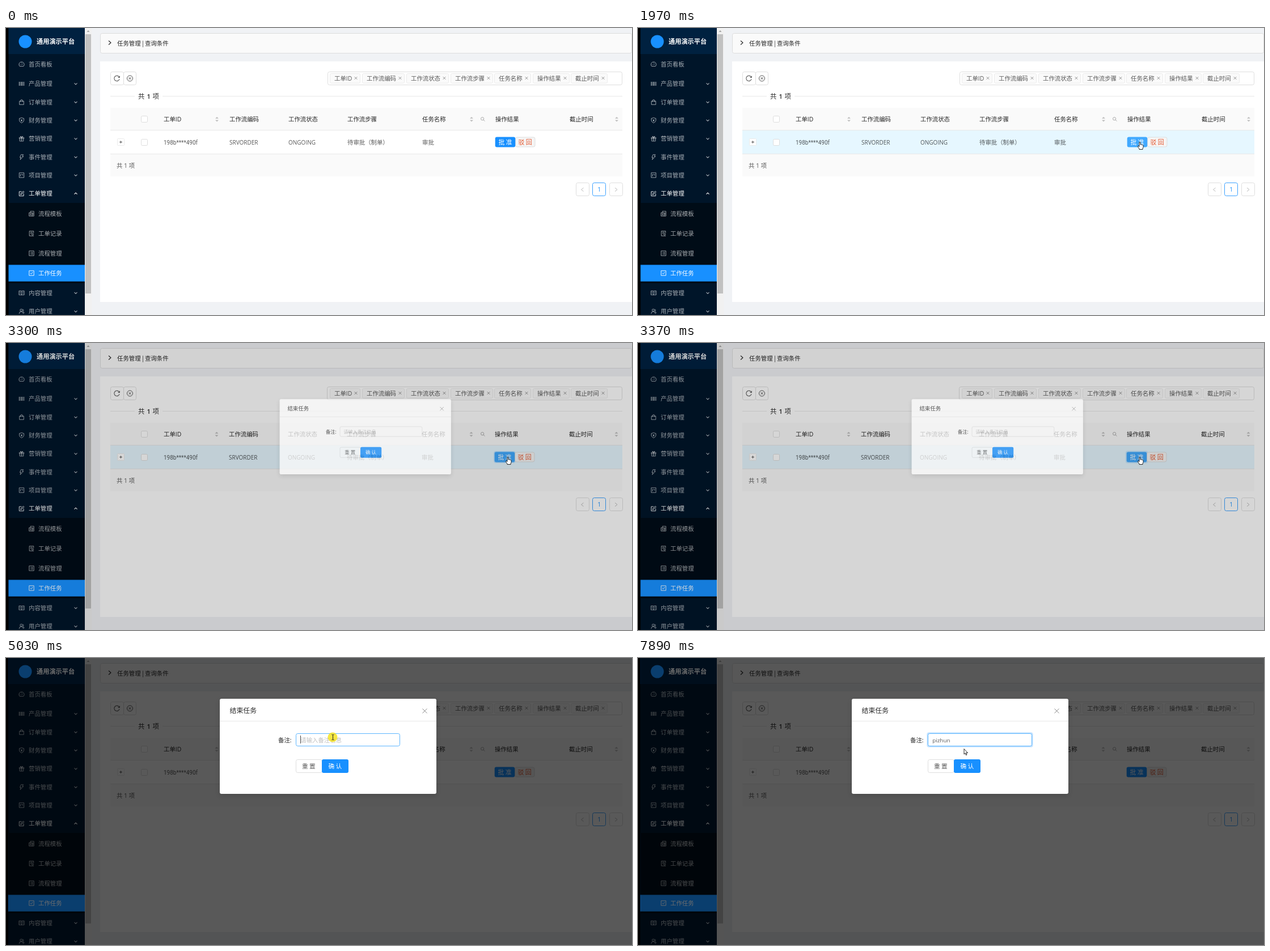
Write an HTML page with a canvas that moves like this. It is 1104 px wide and 507 px high and loops after 7.99 s.

```html
<!DOCTYPE html>
<html lang="zh-CN">
<head>
<meta charset="utf-8">
<title>任务审批</title>
<style>
html, body { margin: 0; width: 100%; height: 100%; overflow: hidden; background: #000; }
canvas { display: block; width: 100%; height: 100%; }
</style>
</head>
<body>
<canvas id="stage" width="1104" height="507"></canvas>
<script>
const stage = document.getElementById('stage').getContext('2d');
const layer = new OffscreenCanvas(1104, 507).getContext('2d');
let c = stage;
const LOOP = 7990, OPEN = 3250, CLICK = 3130, FOCUS = 5030;
const BLUE = '#1890ff', LIGHT = '#40a9ff', LINE = '#d9d9d9', RULE = '#e8e8e8';
const DARK = 'rgba(0,0,0,.85)', BODY = 'rgba(0,0,0,.65)', GREY = 'rgba(0,0,0,.45)';
const SANS = '"Open Sans","Noto Sans CJK SC","Noto Sans CJK",sans-serif';
const CJK = '"Noto Sans CJK SC","Noto Sans CJK",sans-serif';

const clamp = v => Math.max(0, Math.min(1, v));
const ramp = (t, a, b) => clamp((t - a) / (b - a));
const tick = t => Math.floor((t - 20) / 80) * 80 + 20;

function text(s, x, y, color = BODY, size = 10.4, weight = 400, font = SANS) {
  c.font = `${weight} ${size}px ${font}`;
  c.fillStyle = color;
  c.fillText(s, x, y + size * 0.37);
}
function rect(x, y, w, h, fill) {
  c.fillStyle = fill;
  c.fillRect(x, y, w, h);
}
function box(x, y, w, h, r, fill, border, width = 0.85) {
  const inset = border ? 0.5 : 0;
  c.beginPath();
  c.roundRect(x + inset, y + inset, w - 2 * inset, h - 2 * inset, r);
  if (fill) { c.fillStyle = fill; c.fill(); }
  if (border) { c.strokeStyle = border; c.lineWidth = width; c.stroke(); }
}
function path(d, x, y, stroke, width = 1, fill) {
  const p = new Path2D(d);
  c.save();
  c.translate(x, y);
  c.lineJoin = 'round';
  if (fill) { c.fillStyle = fill; c.fill(p); }
  if (stroke) { c.strokeStyle = stroke; c.lineWidth = width; c.stroke(p); }
  c.restore();
}
function cross(x, y, r, color, width = 0.9) {
  path(`M${-r} ${-r}L${r} ${r}M${r} ${-r}L${-r} ${r}`, x, y, color, width);
}
function ease(x) {
  // cubic-bezier(.08, .82, .17, 1)
  const at = (u, a, b) => 3 * u * (1 - u) ** 2 * a + 3 * u * u * (1 - u) * b + u ** 3;
  let lo = 0, hi = 1;
  for (let i = 0; i < 20; i++) {
    const mid = (lo + hi) / 2;
    if (at(mid, 0.08, 0.17) < x) lo = mid; else hi = mid;
  }
  return at(hi, 0.82, 1);
}

// Icons live in a 10 x 10 box
const icons = {
  gauge: 'M1.6 8.6A4.6 4.6 0 1 1 8.4 8.6ZM5 6L7 3.8M2.2 5.5H3M5 2.2V3',
  bars: 'M.7 1.5V8.5M2.4 1.5V8.5M4.6 1.5V8.5M5.4 1.5V8.5M7.4 1.5V8.5M9.3 1.5V8.5',
  bag: 'M1.2 3.2H8.8V9.3H1.2ZM3.2 4.6V2.4A1.8 1.8 0 0 1 6.8 2.4V4.6',
  shield: 'M5 .5L9 1.8V5.5Q8.5 8 5 9.7Q1.5 8 1 5.5V1.8ZM3.5 3.2L5 5L6.5 3.2M5 5V7.3M3.7 5.5H6.3',
  gift: 'M.9 3H9.1V5H.9ZM1.7 5V9.3H8.3V5M5 3V9.3M5 3Q2 2.7 3 1Q4.5 .5 5 3Q5.5 .5 7 1Q8 2.7 5 3',
  bolt: 'M4 .7H8L6.2 3.8H8.3L2.5 9.5L4 5.6H2Z',
  board: 'M.8 .8H9.2V9.2H.8ZM3 3V7M5 3V4.6M7 3V5.6',
  form: 'M8.6 5V9.2H.8V1.5H5M3.2 6.9L3.6 5L8 .8L9.3 2.1L5 6.4Z',
  book: 'M.4 1.5H4Q5 1.6 5 2.5V9Q5 8.5 4 8.4H.4ZM9.6 1.5H6Q5 1.6 5 2.5M5 9Q5 8.5 6 8.4H9.6V1.5M1.8 3.7H3.5M1.8 5.7H3.5M6.5 3.7H8.2M6.5 5.7H8.2',
  users: 'M2.4 3A2 2 0 1 1 6.4 3A2 2 0 1 1 2.4 3M.7 9.3Q1 5.3 4.4 5.3Q7.6 5.3 8 9.3M7 1.2Q9 2 8.2 4.2L7.4 5Q9.2 6 9.5 8.4',
  pages: 'M.7 9.2V3.4H3V.8H9.2V9.2ZM3 3.4H6.2V9.2M2 5.5H4.8M2 7.2H4.8M7.7 3V7.5',
  audit: 'M8.7 4V.8H1.2V9.2H5M3 3H7M3 5H5M8.5 6.4A1.5 1.5 0 1 0 5.5 6.4A1.5 1.5 0 1 0 8.5 6.4M5 9.3H9',
  list: 'M.8 .8H9.2V9.2H.8ZM2.6 3.2H3.4M4.6 3.2H7.5M2.6 5H3.4M4.6 5H7.5M2.6 6.8H3.4M4.6 6.8H7.5',
  check: 'M.8 .8H9.2V9.2H.8ZM2.8 4.8L4.5 6.6L7.3 3.2'
};
const menu = [
  ['gauge', '首页看板', 64], ['bars', '产品管理', 98.5], ['bag', '订单管理', 131],
  ['shield', '财务管理', 163], ['gift', '营销管理', 195.5], ['bolt', '事件管理', 228],
  ['board', '项目管理', 260], ['form', '工单管理', 292.5], ['book', '内容管理', 468], ['users', '用户管理', 500.5]
];
const submenu = [
  ['pages', '流程模板', 328], ['audit', '工单记录', 363], ['list', '流程管理', 398], ['check', '工作任务', 433]
];

function sidebar() {
  rect(0, 0, 5, 507, '#000');
  rect(4.5, 0, 134.5, 507, '#001529');
  rect(4.5, 0, 134.5, 46, '#002140');
  rect(4.5, 309, 134.5, 142, '#000c17');
  rect(4.5, 418.4, 134.5, 29.3, BLUE);
  c.fillStyle = BLUE;
  c.beginPath();
  c.arc(34, 24, 11.5, 0, 7);
  c.fill();
  text('通用演示平台', 54, 24, '#fff', 11.2, 700);
  const dim = 'rgba(255,255,255,.65)';
  for (const [icon, label, y] of menu) {
    const open = icon === 'form', color = open ? '#fff' : dim;
    path(icons[icon], 22.5, y - 5, color, 0.9);
    text(label, 40, y, color, 10.4, open ? 500 : 400);
    if (icon !== 'gauge') path(open ? 'M-2.5 1.2L0-1.3L2.5 1.2' : 'M-2.5-1.2L0 1.3L2.5-1.2', 123, y, color, 1.1);
  }
  for (const [icon, label, y] of submenu) {
    const color = icon === 'check' ? '#fff' : dim;
    path(icons[icon], 40, y - 5, color, 0.9);
    text(label, 57, y, color);
  }
  rect(139, 0, 12, 507, '#f1f1f1');
  rect(140, 11, 10, 458, '#c1c1c1');
  path('M-2.5 1.5L0-1.5L2.5 1.5Z', 145, 5.5, null, 0, '#a3a3a3');
}

function toolbar(dx) {
  box(166, 9, 938, 36, 3, '#fafafa', LINE);
  path('M-2-3.5L2 0L-2 3.5', 183, 26, DARK, 1.1);
  text('任务管理 | 查询条件', 196, 27, DARK, 10.4, 400, CJK);
  rect(166, 59, 938, 425, '#fff');
  box(184, 77, 24, 24, 3, '#fff', LINE);
  box(207, 77, 23, 24, 3, '#fff', LINE);
  path('M4.3-2A4.7 4.7 0 1 0 4.6 1.2M4.8-4.2V-1.5H2', 195.5, 89, BODY, 1.1);
  path('M5 0A5 5 0 1 1-5 0A5 5 0 1 1 5 0', 218.5, 89, BODY, 1);
  cross(218.5, 89, 2, BODY, 1);
  box(567 + dx, 77, 520 - dx, 24, 3, '#fff', LINE);
  const tags = [['工单ID', 571, 54], ['工作流编码', 628, 75], ['工作流状态', 706, 75], ['工作流步骤', 784, 75],
    ['任务名称', 861, 65], ['操作结果', 929, 65], ['截止时间', 996, 65]];
  for (const [label, x, w] of tags) {
    box(x, 80, w, 18, 2, '#fafafa', RULE);
    text(label, x + 8, 89);
    cross(x + w - 8, 88.5, 2.4, GREY);
  }
  rect(184, 120, 43, 1, RULE);
  rect(276, 120, 811, 1, RULE);
  text('共', 233, 120.5, DARK, 11.4);
  text('1', 248.5, 120.5, DARK, 11, 600);
  text('项', 258.5, 120.5, DARK, 11.4);
}

function sorter(x) {
  path('M-3-1L0-4L3-1ZM-3 1.5L0 4.5L3 1.5Z', x, 161, null, 0, '#bfbfbf');
}
function tickBox(y) {
  box(238, y, 12, 12, 2, '#fff', LINE);
}

function table(t, dx, hover) {
  rect(184, 141, 903, 40, '#fafafa');
  rect(184, 180, 903, 1, RULE);
  if (hover > 0) rect(184, 181, 903, 41, `rgba(230,247,255,${hover})`);
  rect(184, 222, 903, 1, RULE);
  rect(184, 223, 903, 39, '#fafafa');
  tickBox(155);
  tickBox(196);
  box(196, 195, 13, 13, 1, '#fff', RULE);
  path('M-2.5 0H2.5M0-2.5V2.5', 202.5, 201.5, BODY, 0.9);

  const heads = [['工单ID', 278], ['工作流编码', 394 + dx], ['工作流状态', 498 + dx], ['工作流步骤', 602 + dx],
    ['任务名称', 734 + dx], ['操作结果', 863 + dx], ['截止时间', 994 + dx]];
  for (const [label, x] of heads) text(label, x, 161, DARK, 10.4, 500);
  for (const x of [372, 821, 1077]) sorter(x + dx / 2);
  path('M2.2-.7A2.6 2.6 0 1 1-3-.7A2.6 2.6 0 1 1 2.2-.7M1.5 1.2L4 3.6', 840.5, 161, '#aaa', 1);

  text('198b****490f', 278, 202, BODY, 10, 400, 'Roboto,sans-serif');
  text('SRVORDER', 394 + dx, 202, BODY, 10);
  text('ONGOING', 498 + dx, 202, BODY, 10);
  text('待审批（制单）', 602 + dx, 202);
  text('审批', 734 + dx, 202);
  text('共 1 项', 195, 243);

  const wave = ramp(t, 3200, 3600);
  if (wave > 0 && wave < 1) {
    const g = 1 + wave * 3;
    box(863 + dx - g, 192.7 - g, 35 + 2 * g, 17.6 + 2 * g, 4, `rgba(24,144,255,${0.3 * (1 - wave)})`);
  }
  box(898 + dx, 192.5, 35.5, 18, 3, '#f5f5f5', LINE);
  box(862.7 + dx, 192.6, 35.5, 17.8, 3, t >= 1970 && t < 3620 ? LIGHT : BLUE);
  text('批 准', 868.5 + dx, 202, '#fff', 10.9, 400, CJK);
  text('驳 回', 903.5 + dx, 202, '#e4572e', 10.9, 400, CJK);
}

function pager() {
  for (const [x, color] of [[1005, LINE], [1034, BLUE], [1064, LINE]]) box(x, 273, 24, 24, 3, '#fff', color);
  path('M2-3.2L-2 0L2 3.2', 1016.5, 285.5, '#bbb', 1);
  text('1', 1043.3, 285, BLUE);
  path('M-2-3.2L2 0L-2 3.2', 1076, 285.5, '#bbb', 1);
}

const typed = [[6280, 'p'], [6500, 'pi'], [6760, 'piz'], [6810, 'pizhu'], [6960, 'pizhun']];

function dialog(t, pointer) {
  c.save();
  c.shadowColor = 'rgba(0,0,0,.15)';
  c.shadowBlur = 9;
  c.shadowOffsetY = 3;
  box(377, 72, 382, 168, 3, '#fff');
  c.restore();
  rect(377, 111, 382, 1, RULE);
  text('结束任务', 394.5, 92.5, DARK, 11.9);
  cross(738.5, 93.5, 4, GREY, 1);
  text('备注:', 480, 145, DARK);

  const focus = ramp(t, FOCUS + 20, FOCUS + 160);
  if (focus > 0) box(509.3, 131.3, 187.4, 26.4, 4, `rgba(24,144,255,${0.25 * focus})`);
  box(511, 133, 184, 23, 3, '#fff', t >= FOCUS || pointer.kind === 'beam' ? LIGHT : LINE);
  const value = (typed.filter(e => t >= e[0]).pop() || [0, ''])[1];
  if (value) text(value, 519.3, 145, BODY, 9.8);
  else text('请输入备注信息', 519.3, 145, '#bfbfbf');
  const blink = t >= FOCUS && t < 5580 || t >= 6130 && t < 7540;
  if (blink) {
    c.font = `9.8px ${SANS}`;
    rect(519 + Math.round(c.measureText(value).width * 0.98), 137, 1, 14, '#444');
  }

  box(511, 179, 47, 24, 3, '#fff', LINE);
  box(557, 179, 47, 24, 3, pointer.kind === 'hand' && t > 3800 ? LIGHT : BLUE);
  text('重 置', 522, 191, BODY, 10.7, 400, CJK);
  text('确 认', 568.5, 191, '#fff', 10.7, 500, CJK);
}

// Zooms out of the clicked button and fades in as one group
function popup(t, pointer) {
  const k = ease(ramp(tick(t), OPEN, OPEN + 300));
  const s = 0.2 + 0.8 * k, ox = 883, oy = 202;
  c = layer;
  c.clearRect(0, 0, 1104, 507);
  c.save();
  c.translate(ox, oy);
  c.scale(s, s);
  c.translate(-ox, -oy);
  dialog(t, pointer);
  c.restore();
  c = stage;
  c.globalAlpha = k;
  c.drawImage(layer.canvas, 0, 0);
  c.globalAlpha = 1;
}

const route = [
  [260, 1030, 484], [1060, 904, 260], [1780, 886, 197], [1860, 885, 201], [3540, 885, 201], [3860, 598, 199],
  [4020, 598, 199], [4180, 585, 194], [4260, 585, 194], [4740, 576, 140]
];
const inside = (x, y, l, t, r, b) => x >= l && x <= r && y >= t && y <= b;

function pointerAt(t) {
  if (t >= 7890) return { x: 574.5, y: 160, kind: 'arrow' };
  if (t < 260) return { kind: 'none' };
  const q = tick(t), i = route.findIndex(p => p[0] > q);
  let [, x, y] = route[route.length - 1];
  if (i > 0) {
    const [a, ax, ay] = route[i - 1], [b, bx, by] = route[i], k = ramp(q, a, b);
    x = ax + (bx - ax) * k;
    y = ay + (by - ay) * k;
  }
  let kind = 'arrow';
  if (inside(x, y, 863, 193, 898, 210) && t < 3620) kind = 'hand';
  if (t > 3700 && inside(x, y, 557, 179, 604, 203)) kind = 'hand';
  if (t > 4200 && inside(x, y, 511, 133, 695, 156)) kind = 'beam';
  return { x, y, kind };
}

const shapes = {
  arrow: 'M.5 .5V10L2.6 8.2L4 11.6L5.5 10.9L4.1 7.6H7Z',
  hand: 'M-1 1Q0-.6 1 1V5Q2 4.3 2.8 5.2Q4 4.6 4.5 5.6Q5.7 5.2 6 6.4V9.5Q5.8 11 5 12V13.5H-1V12.3L-3.7 8.6Q-3.8 7-2.2 7.5L-1 8.6Z'
};

function cursor(t, { x, y, kind }) {
  if (kind === 'none') return;
  if (t >= CLICK && t < 3290 || t >= FOCUS && t < 5110) {
    c.fillStyle = 'rgba(245,225,20,.8)';
    c.beginPath();
    c.arc(x, y, 8.5, 0, 7);
    c.fill();
  }
  if (kind === 'beam') path('M-2-4.5H-.6L0-4L.6-4.5H2M0-4V4M-2 4.5H-.6L0 4L.6 4.5H2', x + 0.5, y, '#222', 1);
  else path(shapes[kind], x, y, '#111', 0.9, '#fff');
}

function draw(t) {
  const dx = t >= OPEN ? -1 : 0;
  const pointer = pointerAt(t);
  const hover = ramp(tick(t), 1500, 1780) * (1 - ramp(tick(t), 3540, 3860));
  rect(0, 0, 1104, 507, '#f0f2f5');
  sidebar();
  toolbar(dx);
  table(t, dx, hover);
  pager();
  if (tick(t) >= OPEN) {
    const fade = ramp(tick(t), OPEN, OPEN + 200);
    rect(5, 0, 134, 507, `rgba(0,0,0,${0.57 * fade})`);
    rect(139, 0, 965, 507, `rgba(0,0,0,${0.65 * fade})`);
    popup(t, pointer);
  }
  cursor(t, pointer);
}

const start = performance.now();
function loop() {
  draw((performance.now() - start) % LOOP);
  requestAnimationFrame(loop);
}
loop();
</script>
</body>
</html>
```
